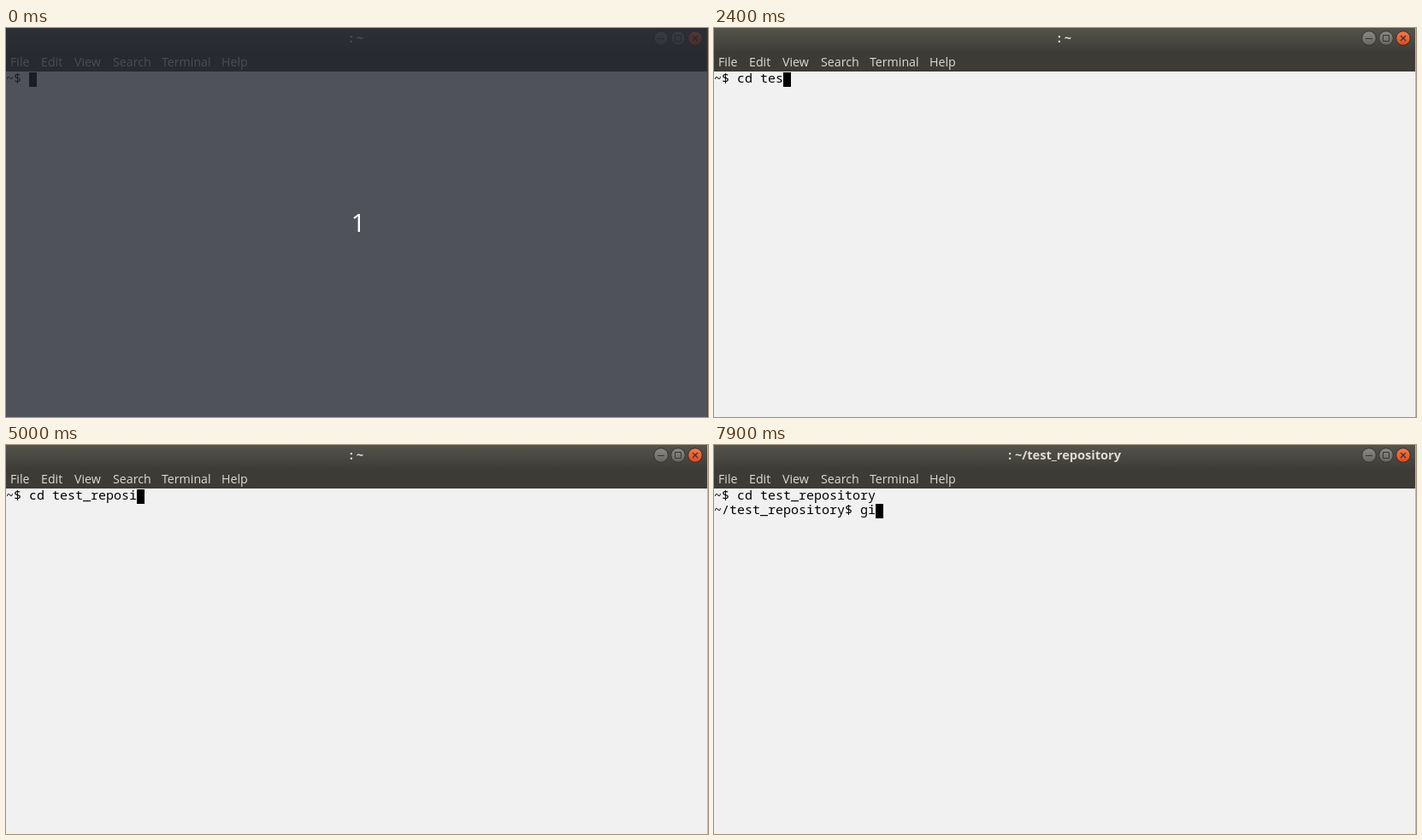
These frames come from a looping animation (821 by 456 pixels, 8000 ms). An HTML page with a canvas:

```html
<!DOCTYPE html>
<html lang="en">
<head>
<meta charset="utf-8">
<title>Terminal</title>
<style>
  html, body { margin: 0; width: 100%; height: 100%; overflow: hidden; background: #f1f1f1; }
  canvas { display: block; }
</style>
</head>
<body>
<canvas id="stage" width="821" height="456"></canvas>
<script>
const W = 821, H = 456, LOOP = 8000;
const CELL = 9, ROW = 17, TOP = 52;
const SANS = '"Open Sans", "Noto Sans", sans-serif';
const MONO = '"Noto Sans Mono", "DejaVu Sans Mono", monospace';
const ctx = document.getElementById('stage').getContext('2d');

const COMMAND = 'cd test_repository';
const NEXT = 'gi';
const COUNTDOWN_END = 500, TITLE_AT = 6000, ENTER_AT = 6500;

// [time, characters typed so far]
const KEYS = [
  [900, 2], [1600, 3], [2200, 4], [2300, 5], [2400, 6], [3000, 7],
  [3500, 8], [3700, 9], [4000, 10], [4200, 12], [4500, 13],
  [5000, 14], [5100, 15], [5300, 16], [5400, 17], [6000, 18]
];
const NEXT_KEYS = [[7800, 1], [7900, 2]];
const BLINK_OFF = [[1500, 1600], [1900, 2200], [6700, 7200]];

const MENU = [['File', 5], ['Edit', 41], ['View', 80], ['Search', 125], ['Terminal', 182], ['Help', 252]];

function typed(text, keys, t) {
  let count = 0;
  for (const [at, n] of keys) if (t >= at) count = n;
  return text.slice(0, count);
}

function rect(x, y, w, h, fill) {
  ctx.fillStyle = fill;
  ctx.fillRect(x, y, w, h);
}

function text(str, x, y, font, fill, align = 'left') {
  ctx.font = font;
  ctx.fillStyle = fill;
  ctx.textAlign = align;
  ctx.fillText(str, x, y);
}

function shade(y0, y1, from, to) {
  const g = ctx.createLinearGradient(0, y0, 0, y1);
  g.addColorStop(0, from);
  g.addColorStop(1, to);
  return g;
}

function button(x, from, to, edge) {
  ctx.beginPath();
  ctx.arc(x, 12, 8.3, 0, Math.PI * 2);
  ctx.fillStyle = shade(4, 20, from, to);
  ctx.fill();
  ctx.lineWidth = 1;
  ctx.strokeStyle = edge;
  ctx.stroke();
}

function drawButtons() {
  const ink = '#373631';
  for (const x of [766, 786]) button(x, '#8b8a82', '#67665f', '#353430');
  button(806, '#f37a4e', '#df4a1b', '#3a2e28');
  ctx.strokeStyle = ink;
  ctx.lineWidth = 1;
  ctx.beginPath();
  ctx.moveTo(762, 12.5);
  ctx.lineTo(770, 12.5);
  ctx.rect(782.5, 8.5, 7, 7);
  ctx.stroke();
  ctx.lineWidth = 1.3;
  ctx.beginPath();
  ctx.moveTo(803, 9);
  ctx.lineTo(809, 15);
  ctx.moveTo(809, 9);
  ctx.lineTo(803, 15);
  ctx.stroke();
}

function drawChrome(title) {
  rect(0, 0, W, 28, shade(0, 28, '#55544b', '#3d3c37'));
  rect(0, 28, W, 23, '#3c3b36');
  text(title, 410, 17, 'bold 14.6px ' + SANS, '#dfdbd2', 'center');
  drawButtons();
  for (const [label, x] of MENU) text(label, x, 45, '14.2px ' + SANS, '#dfdbd2');
  rect(W - 1, 0, 1, H, '#b9b8b4');
}

function drawLine(str, row) {
  text(str, 0, TOP + row * ROW + 12, '15px ' + MONO, '#000');
}

function drawShell(t) {
  const entered = t >= ENTER_AT;
  const lines = ['~$ ' + typed(COMMAND, KEYS, t)];
  if (entered) lines.push('~/test_repository$ ' + typed(NEXT, NEXT_KEYS, t));
  lines.forEach(drawLine);
  if (BLINK_OFF.some(([a, b]) => t >= a && t < b)) return;
  const row = lines.length - 1;
  rect(lines[row].length * CELL, TOP + row * ROW, CELL, ROW, '#000');
}

function drawCountdown() {
  rect(0, 0, W, H, 'rgba(34, 38, 48, 0.78)');
  text('1', 403.5, 239, '30px ' + SANS, '#fff');
}

function draw(t) {
  rect(0, 0, W, H, '#f1f1f1');
  drawChrome(t < TITLE_AT ? ': ~' : ': ~/test_repository');
  drawShell(t);
  if (t < COUNTDOWN_END) drawCountdown();
}

const start = performance.now();
function tick() {
  draw((performance.now() - start) % LOOP);
  requestAnimationFrame(tick);
}
tick();
</script>
</body>
</html>
```
